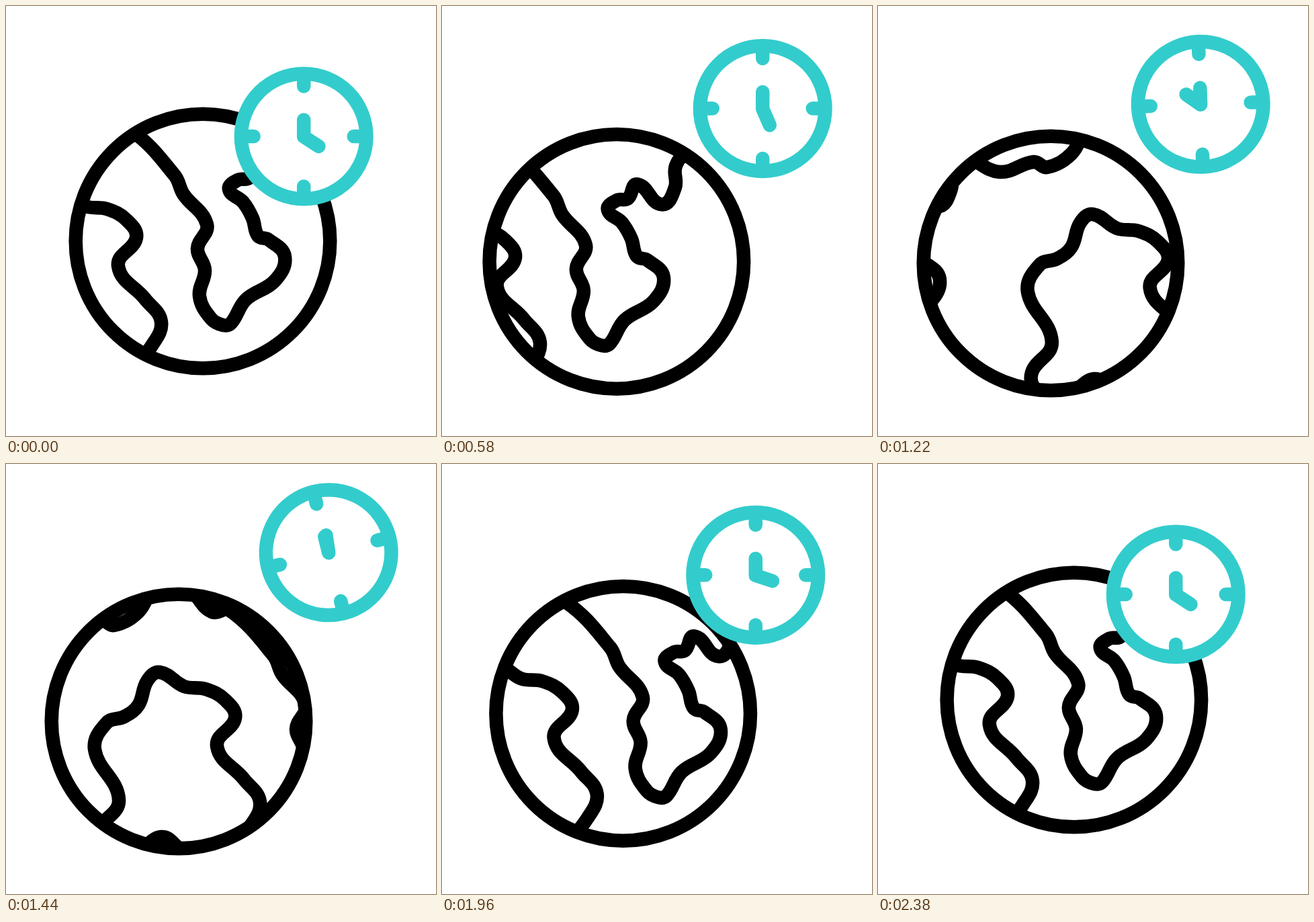
These frames come from a looping animation (640 by 640 pixels, 2400 ms). An HTML page with a canvas:

```html
<!DOCTYPE html>
<html lang="en">
<head>
<meta charset="utf-8">
<title>World clock</title>
<style>
  html, body { margin: 0; width: 100%; height: 100%; overflow: hidden; background: #fff; }
  canvas { display: block; width: 640px; height: 640px; }
</style>
</head>
<body>
<canvas id="stage" width="640" height="640"></canvas>
<script>
const ctx = document.getElementById('stage').getContext('2d');
const LOOP = 2400, MAP_WIDTH = 561, LINE = 20.5;
const INK = '#000', TEAL = '#33cccc';

// Turning points of the coastlines, measured from the globe's centre.
const AMERICAS = '-160,-190 -134,-163 -107,-165 -42,-98 -29,-70 6,-25 -8,11 3,43 -5,82 12,115 ' +
  '30,125 42,122 64,87 107,59 122,23 98,-2 82,-8 74,-34 60,-58 39,-77 52,-91 69,-94 ' +
  '83,-115 119,-85 139,-110 140,-142 157,-158 211,-136 262,-151 282,-143 318,-163 336,-195';
const AFRICA = '380,190 352,172 310,198 268,190 259,163 289,117 253,42 271,2 297,-7 318,-24 ' +
  '331,-60 350,-73 386,-52 418,-48 447,-32 462,-5 435,37 475,86 499,120 484,157 450,198';

// Smooth path through the points; each tangent runs parallel to its neighbours' chord.
function coastline(text) {
  const points = text.split(' ').map(p => p.split(',').map(Number));
  const at = i => points[Math.max(0, Math.min(points.length - 1, i))];
  const handle = (i, reach) => {
    const [x, y] = at(i), [ax, ay] = at(i - 1), [bx, by] = at(i + 1);
    const k = reach / Math.hypot(bx - ax, by - ay);
    return [x + (bx - ax) * k, y + (by - ay) * k];
  };
  const path = new Path2D();
  path.moveTo(...at(0));
  for (let i = 1; i < points.length; i++) {
    const [x, y] = at(i), [px, py] = at(i - 1);
    const reach = 0.38 * Math.hypot(x - px, y - py);
    path.bezierCurveTo(...handle(i - 1, reach), ...handle(i, -reach), x, y);
  }
  return path;
}
const coasts = [AMERICAS, AFRICA].map(coastline);

const span = (t, start, length) => Math.max(0, Math.min(1, (t - start) / length));
const ease = (t, start, length) => {
  const u = span(t, start, length);
  return u * u * (3 - 2 * u);
};

function disc(r) {
  ctx.beginPath();
  ctx.arc(0, 0, r, 0, 2 * Math.PI);
}

function polyline(...points) {
  ctx.beginPath();
  points.forEach(p => ctx.lineTo(...p));
  ctx.stroke();
}

function drawGlobe(x, y, shift) {
  ctx.save();
  ctx.translate(x, y);
  ctx.strokeStyle = INK;
  ctx.save();
  disc(196);
  ctx.clip();
  ctx.translate(-MAP_WIDTH - shift, 0);
  for (let copy = 0; copy < 3; copy++) {
    coasts.forEach(path => ctx.stroke(path));
    ctx.translate(MAP_WIDTH, 0);
  }
  ctx.restore();
  disc(189.3);
  ctx.stroke();
  ctx.restore();
}

function drawClock(x, y, tilt, handTurn) {
  ctx.save();
  ctx.translate(x, y);
  ctx.rotate(tilt);
  ctx.strokeStyle = TEAL;
  ctx.fillStyle = '#fff';
  disc(93.3);
  ctx.fill();
  ctx.stroke();
  for (let i = 0; i < 4; i++) {
    polyline([0, -92], [0, -74.5]);
    ctx.rotate(Math.PI / 2);
  }
  const angle = 33 * Math.PI / 180 + handTurn;
  polyline([0, -24.5], [0, 0.5], [26.5 * Math.cos(angle), 0.5 + 26.5 * Math.sin(angle)]);
  ctx.restore();
}

function frame(now) {
  const t = now % LOOP;
  const spin = ease(t, 205, 2000);
  const out = ease(t, 205, 455);
  const back = Math.sin(span(t, 1825, 575) * Math.PI / 2);
  const globeOut = out - 0.97 * back;
  const clockOut = out - back;

  // Two hops, a lean to the right, then one to the left.
  const step = start => ease(t, start, 250);
  const hop = step(660) - step(910) + step(1160) - step(1410);
  const tilt = 13 * (step(660) - step(910)) - 14 * (step(1160) - step(1660));

  ctx.fillStyle = '#fff';
  ctx.fillRect(0, 0, 640, 640);
  ctx.lineWidth = LINE;
  ctx.lineCap = ctx.lineJoin = 'round';
  drawGlobe(293 - 36 * globeOut, 350 + 33 * globeOut, MAP_WIDTH * spin);
  drawClock(443.2 + 37 * clockOut, 194 - 45 * clockOut - 18 * hop,
    tilt * Math.PI / 180, 2 * Math.PI * spin);
  requestAnimationFrame(frame);
}
requestAnimationFrame(frame);
</script>
</body>
</html>
```
